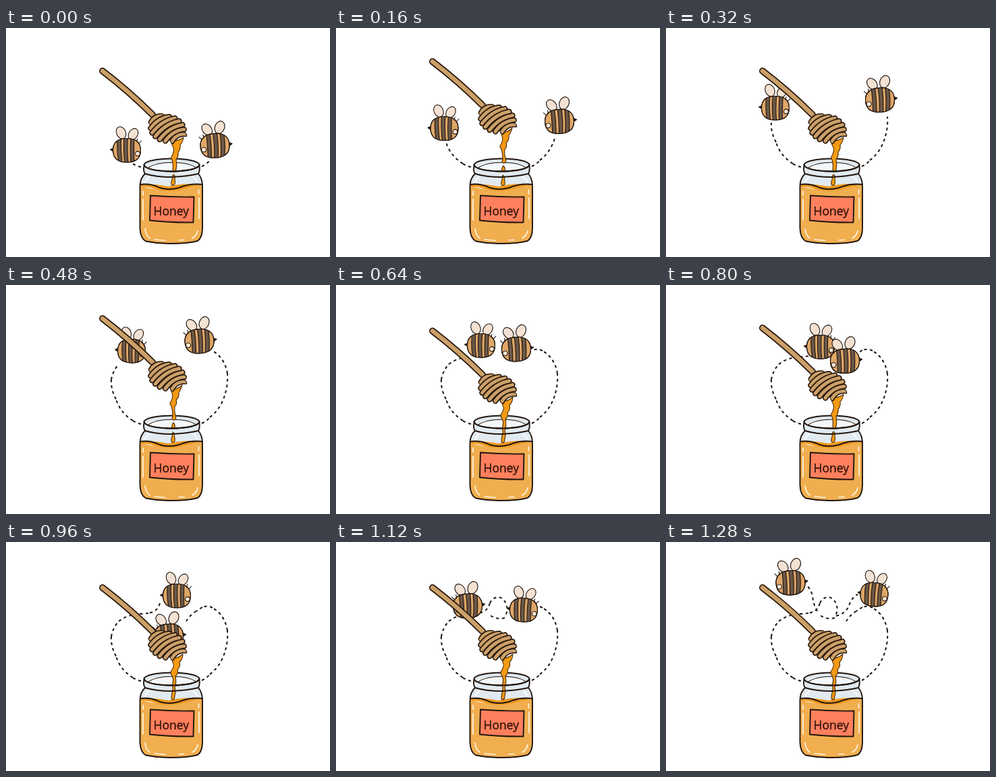
An HTML page without scripts that plays this animation: 480x341 px, repeating every 1.44 s.

```html
<!DOCTYPE html>
<html lang="en">
<head>
<meta charset="utf-8">
<title>Honey jar and bees</title>
<style>
html, body { margin: 0; width: 100%; height: 100%; overflow: hidden; background: #fff; }
svg { display: block; width: 100vw; height: 100vh; }
.ink { stroke: #21150e; stroke-width: 1.9; stroke-linejoin: round; stroke-linecap: round; }
.thin { stroke-width: 1.1; }
.line { fill: none; }
.trail { fill: none; stroke: #1d130d; stroke-width: 2; stroke-dasharray: 4.2 4.6; }
.drip { fill: #f39a14; stroke: #4a2a0c; stroke-width: 1.1; stroke-linejoin: round; }
.shine { fill: none; stroke: #fff6e4; stroke-width: 1.7; stroke-linecap: round; }
.label { font: 500 17.5px "Open Sans", Lato, sans-serif; fill: #35150d; stroke: #35150d; stroke-width: .4; stroke-linejoin: round; }
.wood { fill: none; stroke-linecap: round; }
.edge { stroke: #2b1a0d; }
.tan { stroke: #cba069; }
</style>
</head>
<body>
<svg viewBox="0 0 480 341">
  <defs>
    <path id="body" d="M-20.500 1C-21-11-14-17.500-1-17.500C14-18 20.500-11 20.500 0C20.500 12 14 18 0 18C-13 18-20 12-20.500 1z"/>
    <clipPath id="belly"><use href="#body"/></clipPath>

    <g id="bee" class="ink thin">
      <g fill="#f3e2d3">
        <ellipse rx="6.800" ry="9.300" transform="translate(-8.500 -26) rotate(-24)"/>
        <ellipse rx="6.500" ry="9" transform="translate(9.500 -24) rotate(32)"/>
      </g>
      <path d="M-20-3L-24.500-1L-20 2z" fill="#21150e"/>
      <use href="#body" fill="#dfa768"/>
      <g clip-path="url(#belly)" fill="#6b5848">
        <path d="M-13.500-18Q-15.500 0-12 18H-7Q-9.500 0-8.500-18z"/>
        <path d="M-4-19Q-5.500 0-3 19H2Q0 0 1.500-19z"/>
        <path d="M6-19Q4.500 0 6 19H11Q10 0 11-19z"/>
      </g>
      <use href="#body" fill="none"/>
      <path d="M15-12L15.500-17M17.500-9.500L21.500-14" class="line"/>
      <circle cx="16" cy="5" r="3.400" fill="#fbe9d6"/>
    </g>

    <g id="rib" class="wood">
      <path d="M2-20Q-7-3-1 20" class="edge" stroke-width="8.600"/>
      <path d="M2-20Q-7-3-1 20" class="tan" stroke-width="5"/>
    </g>
  </defs>

  <rect width="480" height="341" fill="#fff"/>

  <!-- flight trails, each pair of pieces appears as the bees pass -->
  <g class="trail">
    <path d="M200 207Q194 206 188 202M290 206Q297 203 302 197"/>
    <path d="M188 202Q169 190 163 170M302 197Q319 184 325 161">
      <animate attributeName="visibility" values="hidden;visible" keyTimes="0;.11111" calcMode="discrete" dur="1.44s" repeatCount="indefinite"/>
    </path>
    <path d="M163 170Q155 155 156 141M325 161Q329 148 328 132">
      <animate attributeName="visibility" values="hidden;visible" keyTimes="0;.22222" calcMode="discrete" dur="1.44s" repeatCount="indefinite"/>
    </path>
    <path d="M156 141Q158 128 167 118M328 132Q324 108 306 98">
      <animate attributeName="visibility" values="hidden;visible" keyTimes="0;.33333" calcMode="discrete" dur="1.44s" repeatCount="indefinite"/>
    </path>
    <path d="M167 118Q180 108 198 107M306 98Q299 94 291 97">
      <animate attributeName="visibility" values="hidden;visible" keyTimes="0;.44444" calcMode="discrete" dur="1.44s" repeatCount="indefinite"/>
    </path>
    <path d="M198 107Q206 107 213 105.500M291 97Q286 100 282 103">
      <animate attributeName="visibility" values="hidden;visible" keyTimes="0;.55555" calcMode="discrete" dur="1.44s" repeatCount="indefinite"/>
    </path>
    <path d="M213 105.500Q225 103 228 91M282 103Q273 108 267 118">
      <animate attributeName="visibility" values="hidden;visible" keyTimes="0;.66666" calcMode="discrete" dur="1.44s" repeatCount="indefinite"/>
    </path>
    <path d="M228 91C233 80 246 78 252 92Q256 102 250 111M250 113Q238 116 228 109">
      <animate attributeName="visibility" values="hidden;visible" keyTimes="0;.77777" calcMode="discrete" dur="1.44s" repeatCount="indefinite"/>
    </path>
    <path d="M252 110Q268 106 272 92Q276 82 284 78M224 103Q218 93 217 79Q214 70 208 64">
      <animate attributeName="visibility" values="hidden;visible" keyTimes="0;.88888" calcMode="discrete" dur="1.44s" repeatCount="indefinite"/>
    </path>
  </g>

  <!-- bees -->
  <g>
    <animateTransform attributeName="transform" type="translate" calcMode="discrete" dur="1.44s" repeatCount="indefinite"
      values="179 182;160.500 149.500;162 119;186 98;215 90;229 92;253 80;278 101;308.500 78"/>
    <g>
      <animateTransform attributeName="transform" type="rotate" calcMode="discrete" dur="1.44s" repeatCount="indefinite"
        values="0;0;1;2;1;0;0;3;5"/>
      <use href="#bee"/>
    </g>
  </g>
  <g>
    <animateTransform attributeName="transform" type="translate" calcMode="discrete" dur="1.44s" repeatCount="indefinite"
      values="309.500 175;331 139;317 107;286.500 83.500;267 95.500;265 113;241 140;195 95;184.500 60.500"/>
    <g>
      <animateTransform attributeName="transform" type="rotate" calcMode="discrete" dur="1.44s" repeatCount="indefinite"
        values="-4;-4;-4;-4;-4;-3;-3;-3;-3"/>
      <use href="#bee" transform="scale(-1.05 1.02)"/>
    </g>
  </g>

  <!-- jar glass and honey -->
  <path d="M205 205Q203 213 207 217Q199 225 198.500 236H291Q291 224 284 217Q288 213 286 205z" fill="#e1eaf0"/>
  <ellipse cx="245.500" cy="204" rx="41" ry="9.500" fill="#dfe8ed" class="ink"/>
  <ellipse cx="245.500" cy="206" rx="35.500" ry="5.800" fill="#f5f8fa"/>
  <path d="M211 208Q222 200.500 246 200.300Q270 200.500 280 207" class="ink thin line"/>
  <path d="M198.500 234Q222 244 246 238Q270 231 291 234V298Q291 313 285 317Q245 324 206 317Q199 311 198.500 298z" fill="#f0ae4f"/>
  <path d="M199 233Q218 231 240 236Q266 230 291 233Q272 237 258 241Q240 245 222 240Q210 236 199 236z" fill="#ef9a21"/>
  <g class="shine">
    <path d="M203 243V249M203 255V286M206 299Q207 309 213 313M285.500 241V247M286 253V284M284 302Q282 310 276 313M220 315L236 316.500M256 316L264 315.500"/>
    <path d="M212 222Q207 226 206 230M277 222Q282 225 283 229" stroke="#fff"/>
  </g>

  <!-- falling honey -->
  <g class="drip">
    <path d="M244 168Q254 169 263 163Q262 170 258 174Q259 180 255 185Q256 190 252 196Q254 207 251 213Q248 217 247 211Q248 202 246 196Q243 194 247 188Q250 180 247 176Q245 172 244 168zM247 219Q251 217 250 225Q252 234 247 234.500Q243 233 246 226z">
      <animate attributeName="visibility" calcMode="discrete" dur="1.44s" repeatCount="indefinite"
        values="visible;hidden;visible;hidden;hidden;visible;hidden;hidden;hidden"/>
    </path>
    <path d="M244 156Q254 156 261 149Q259 156 256 160Q257 167 252 171Q254 177 250 181Q249 188 251 194Q253 200 249 201.500Q245 201 247 195Q247 187 245 180Q241 177 245 172Q248 166 246 161zM248 205Q251 208 250 212Q247 215 245.500 211Q246 207 248 205zM247 219Q250 220 249.500 226Q252 234 247 234.500Q243 233 246 226z">
      <animate attributeName="visibility" calcMode="discrete" dur="1.44s" repeatCount="indefinite"
        values="hidden;visible;hidden;visible;hidden;hidden;hidden;hidden;hidden"/>
    </path>
    <path d="M245 173Q254 174 262 167Q262 174 257 179Q259 186 254 190Q256 195 251 200Q253 209 250 216Q252 223 250 229Q250 235 247 235Q244 234 245.500 227Q248 219 246.500 212Q249 205 246 199Q242 195 246 190Q250 184 247 179z">
      <animate attributeName="visibility" calcMode="discrete" dur="1.44s" repeatCount="indefinite"
        values="hidden;hidden;hidden;hidden;visible;hidden;visible;visible;visible"/>
    </path>
  </g>

  <!-- jar outline -->
  <g class="ink line">
    <path d="M204.500 204Q208 212.500 245 213.500Q282 212.500 286.500 204"/>
    <path d="M204.500 205Q203 213 206 217Q222 222 245 222Q269 221 285 217Q287.500 212 286.500 205"/>
    <path d="M206 217Q198.500 224 198.500 236V298Q199 313 207 317.500Q226 321.500 245 321Q270 321 284 317Q291 312 291 298V236Q291 224 285 217"/>
    <path d="M199 233Q214 231 228 238Q241 242 256 238Q273 231 291 233"/>
  </g>

  <!-- label -->
  <path d="M214 249.500Q245 252 278.500 251.500L277.500 289.500Q244 290 213 286.500z" fill="#ff805c" class="ink"/>
  <text x="218.500" y="279" class="label">Honey</text>

  <!-- dipper -->
  <g>
    <animateTransform attributeName="transform" type="translate" calcMode="discrete" dur="1.44s" repeatCount="indefinite"
      values="0 14;0 0;0 14;0 0;0 18.500;0 14;0 18;0 18;0 18"/>
    <g class="wood">
      <path d="M143 50Q182 80 217 115" class="edge" stroke-width="10"/>
      <path d="M143 50Q182 80 217 115" class="tan" stroke-width="6.600"/>
    </g>
    <g transform="translate(238.500 135.500) rotate(53)">
      <use href="#rib" transform="translate(-20 4) scale(1 .55)"/>
      <use href="#rib" transform="translate(21 -5) scale(1 .55)"/>
      <use href="#rib" transform="translate(-13.500 3) scale(1 .83)"/>
      <use href="#rib" transform="translate(14.500 -3) scale(1 .83)"/>
      <use href="#rib" transform="translate(-7 1.500)"/>
      <use href="#rib" transform="translate(7.500 -1.500)"/>
      <use href="#rib" transform="scale(1 1.040)"/>
    </g>
  </g>
</svg>
</body>
</html>
```
